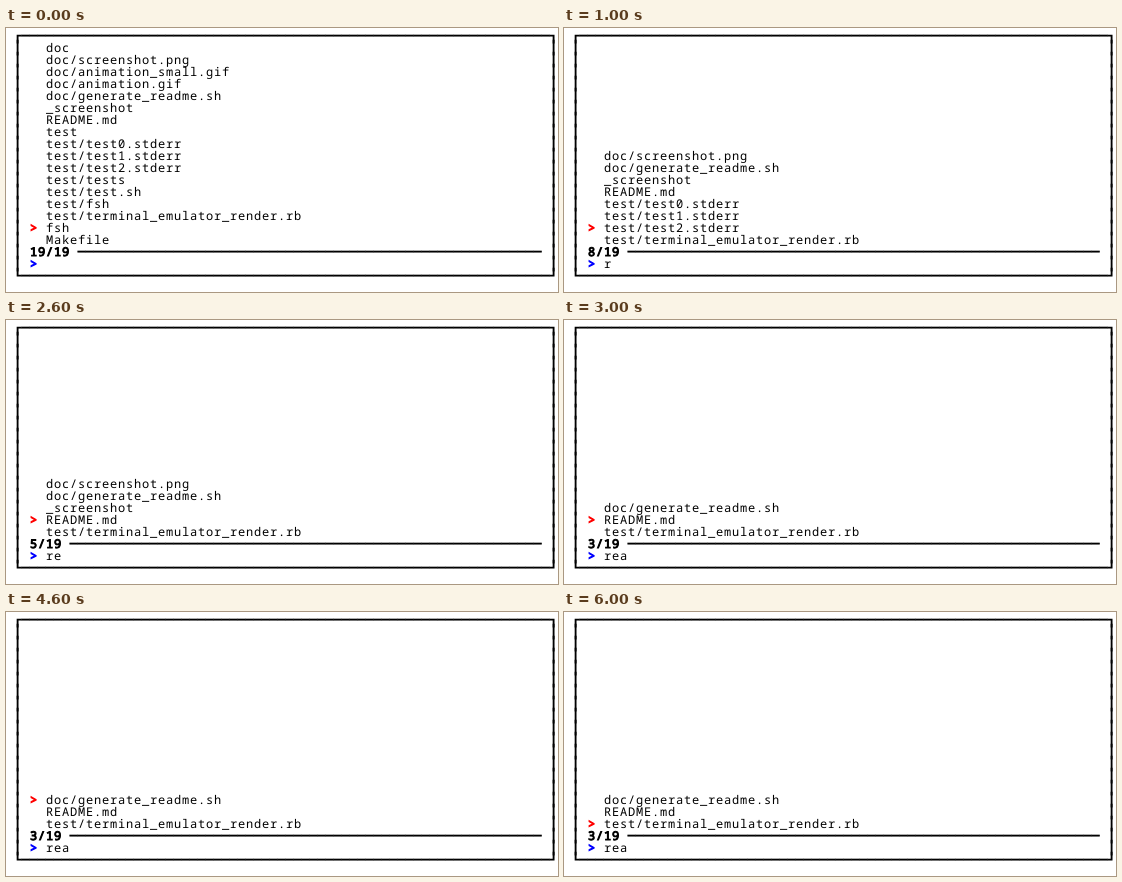
These frames come from a looping animation (552x264 px, 7000 ms). An HTML page with a canvas:

```html
<!DOCTYPE html>
<html lang="en">
<head>
<meta charset="utf-8">
<title>Fuzzy file finder</title>
<style>
html, body { margin: 0; width: 100%; height: 100%; overflow: hidden; background: #fff; }
canvas { display: block; }
</style>
</head>
<body>
<canvas id="stage" width="552" height="264"></canvas>
<script>
const ctx = document.getElementById('stage').getContext('2d');
const COLS = 69, LAST_ROW = 20, CELL_W = 8, CELL_H = 12;
const LIST_END = 17, STATUS_ROW = 18, PROMPT_ROW = 19;
const STEP_MS = 1000;

const files = [
  'doc', 'doc/screenshot.png', 'doc/animation_small.gif', 'doc/animation.gif',
  'doc/generate_readme.sh', '_screenshot', 'README.md', 'test',
  'test/test0.stderr', 'test/test1.stderr', 'test/test2.stderr', 'test/tests',
  'test/test.sh', 'test/fsh', 'test/terminal_emulator_render.rb', 'fsh', 'Makefile'
];
const TOTAL = 19;

// Typed query and the cursor's distance above the last list row.
const steps = [
  { query: '', up: 1 },
  { query: 'r', up: 1 },
  { query: 're', up: 1 },
  { query: 'rea', up: 1 },
  { query: 'rea', up: 2 },
  { query: 'rea', up: 1 },
  { query: 'rea', up: 0 }
];

ctx.font = '12px "Noto Sans Mono", monospace';
ctx.textRendering = 'geometricPrecision';
ctx.lineWidth = 1;

// Keeps paths whose base name contains the query's letters in order.
function search(query) {
  const fuzzy = new RegExp([...query].join('.*'), 'i');
  return files.filter(path => fuzzy.test(path.split('/').pop()));
}

// Bold text is the regular weight with an outline.
function put(text, col, row, color = '#000', bold = false) {
  ctx.fillStyle = ctx.strokeStyle = color;
  [...text].forEach((char, i) => {
    const x = (col + i) * CELL_W, y = (row + 1) * CELL_H;
    ctx.fillText(char, x, y);
    if (bold) ctx.strokeText(char, x, y);
  });
}

function drawBorder() {
  const bar = '─'.repeat(COLS - 3);
  put('┌' + bar + '┐', 1, 0, '#000', true);
  for (let row = 1; row < LAST_ROW; row++) {
    put('│', 1, row, '#000', true);
    put('│', COLS - 1, row, '#000', true);
  }
  put('└' + bar + '┘', 1, LAST_ROW, '#000', true);
}

function draw({ query, up }) {
  ctx.fillStyle = '#fff';
  ctx.fillRect(0, 0, 552, 264);
  drawBorder();

  const found = search(query);
  found.forEach((path, i) => put(path, 5, LIST_END - found.length + 1 + i));
  put('>', 3, LIST_END - up, '#f00', true);

  const count = `${query ? found.length : TOTAL}/${TOTAL} `;
  put(count.padEnd(COLS - 5, '─'), 3, STATUS_ROW, '#000', true);
  put('>', 3, PROMPT_ROW, '#00f', true);
  put(query, 5, PROMPT_ROW);
}

function tick(now) {
  draw(steps[Math.floor(now / STEP_MS) % steps.length]);
  requestAnimationFrame(tick);
}
requestAnimationFrame(tick);
</script>
</body>
</html>
```
